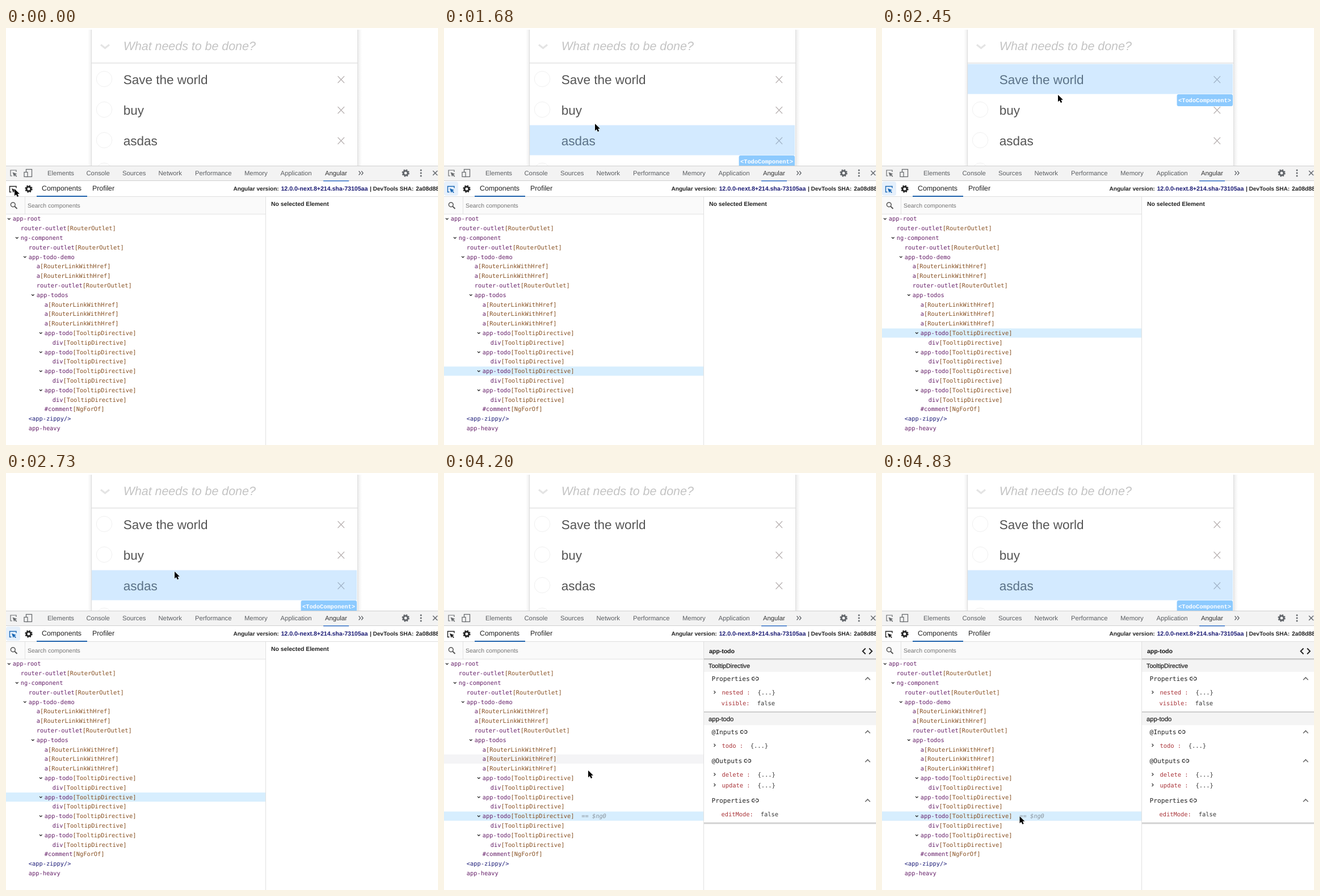
Write an HTML page that moves like this. It is 761 by 736 pixels and loops after 4.9 s.

```html
<!DOCTYPE html>
<html lang="en">
<head>
<meta charset="utf-8">
<title>Component inspector</title>
<style>
  html, body { margin: 0; width: 100%; height: 100%; overflow: hidden; background: #fff; }
  svg { display: block; width: 761px; height: 736px; }
  text { font-family: "Liberation Sans", Arial, sans-serif; white-space: pre; text-rendering: geometricPrecision; }
  text.mono { font-family: "DejaVu Sans Mono", Menlo, monospace; }
  text.code { font-family: "Liberation Mono", "Courier New", monospace; }
</style>
</head>
<body>
<script>
const NS = 'http://www.w3.org/2000/svg';
const LOOP = 4900, STEP = 70;
const ROW_H = 54, LIST_TOP = 63, TREE_TOP = 328.4, TREE_H = 16.8;

function add(parent, tag, attrs, content) {
  const el = document.createElementNS(NS, tag);
  for (const k in attrs) el.setAttribute(k, attrs[k]);
  if (content) el.textContent = content;
  return parent.appendChild(el);
}
const group = (parent, attrs) => add(parent, 'g', attrs);
const rect = (p, x, y, width, height, fill, more) => add(p, 'rect', { x, y, width, height, fill, ...more });
const line = (p, d, stroke, width = 1, more) =>
  add(p, 'path', { d, stroke, 'stroke-width': width, fill: 'none', ...more });
const text = (p, x, y, s, size, fill, more) => add(p, 'text', { x, y, 'font-size': size, fill, ...more }, s);
const mono = (p, x, y, s, fill, size = 10.33, more) => text(p, x, y, s, size, fill, { class: 'mono', ...more });
const show = (el, on) => el.setAttribute('visibility', on ? 'visible' : 'hidden');

const svg = add(document.body, 'svg', { viewBox: '0 0 761 736', width: 761, height: 736 });
rect(svg, 0, 0, 761, 736, '#fff');

// Todo page
const page = group(svg);
const defs = add(svg, 'defs');
function fade(id, from, to) {
  const g = add(defs, 'linearGradient', { id });
  add(g, 'stop', { offset: 0, 'stop-opacity': from });
  add(g, 'stop', { offset: 1, 'stop-opacity': to });
}
fade('left', 0, 0.07);
fade('right', 0.07, 0);
rect(page, 144, 3, 7, 240, 'url(#left)');
rect(page, 620, 3, 7, 240, 'url(#right)');
line(page, 'M150.5 3V243M619.5 3V243', '#dcdcdc');
rect(page, 151, 61, 468, 1.6, '#e4e4e4');
line(page, 'M167 29.5L174.5 35.5L182 29.5', '#e4e4e4', 3.2);
text(page, 206.7, 39, 'What needs to be done?', 21.4, '#c4c4c4', { 'font-style': 'italic' });

const circles = ['Save the world', 'buy', 'asdas', ''].map((label, i) => {
  const y = 90 + i * ROW_H;
  text(page, 206.7, y + 8.5, label, 22.5, '#555');
  line(page, `M584.5 ${y - 5}l11.5 12m0 -12l-11.5 12`, '#b5aeae', 1.1);
  return add(page, 'circle', { cx: 173, cy: y, r: 13.7, fill: 'none', stroke: '#f0f0f0' });
});

const overlay = group(page);
rect(overlay, 151, 0.5, 467, ROW_H - 1, 'rgb(104,182,255)', { opacity: 0.29 });
rect(overlay, 519.5, ROW_H, 98.5, 21, '#8dcafe', { rx: 3 });
text(overlay, 522, ROW_H + 14, '<TodoComponent>', 10.33, '#fff', { class: 'code', 'font-weight': 'bold' });

// Browser tools bar
const tools = group(svg);
rect(tools, 0, 243, 761, 493, '#fff');
rect(tools, 0, 243, 761, 27, '#f3f3f3');
line(tools, 'M0 243.5H761M0 269.5H761', '#d0d0d0');
const tabs = [['Elements', 73], ['Console', 141.5], ['Sources', 205], ['Network', 268.5],
  ['Performance', 333], ['Memory', 420], ['Application', 483.5], ['Angular', 562]];
for (const [name, x] of tabs) text(tools, x, 260, name, 11.25, name === 'Angular' ? '#333' : '#5a5d61');
rect(tools, 559, 269, 45, 1.6, '#3f78c8');
line(tools, 'M621.5 252.5l3 3.5l-3 3.5m4.5 -7l3 3.5l-3 3.5', '#5f6368', 1.3);

function gear(p, x, y, color) {
  const base = { cx: x, cy: y, fill: 'none', stroke: color };
  add(p, 'circle', { ...base, r: 3.9, 'stroke-width': 2.8 });
  add(p, 'circle', { ...base, r: 5.8, 'stroke-width': 1.7, 'stroke-dasharray': '2.5 2.055' });
}
function picker(p, x, y, color, width, right = 11) {
  const g = group(p, { transform: `translate(${x} ${y})` });
  line(g, `M4 11H1V1H${right}V4`, color, width);
  add(g, 'path', { d: 'M4.5 4.5L12.5 7.4L9.6 8.7L12.4 11.5L11.2 12.7L8.4 9.9L7.2 12.6Z', fill: color });
  return g;
}
picker(tools, 7, 250, '#6a6d70', 1.2);
rect(tools, 35.5, 249.5, 10, 13, 'none', { stroke: '#6a6d70', 'stroke-width': 1.3 });
rect(tools, 32, 254.5, 6, 8, '#f3f3f3', { stroke: '#6a6d70', 'stroke-width': 1.3 });
gear(tools, 704, 256, '#5f6368');
for (const dy of [-5, 0, 5]) add(tools, 'circle', { cx: 731, cy: 256 + dy, r: 1.5, fill: '#5f6368' });
line(tools, 'M752 252l8 8m0 -8l-8 8', '#5f6368', 1.4);

// Extension bar
const pickOff = picker(tools, 5.5, 278.5, '#222', 1.4, 12.5);
const pickOn = group(tools);
rect(pickOn, 0, 271, 25, 25, '#e6f0fb', { rx: 4 });
picker(pickOn, 5.5, 278.5, '#1967b5', 1.4, 12.5);
gear(tools, 40, 284, '#222');
text(tools, 63, 287, 'Components', 12.35, '#222');
text(tools, 152, 287, 'Profiler', 12.35, '#222');
line(tools, 'M0 297.5H761', '#dedede');
rect(tools, 54, 296, 89, 2, '#1f62ac');
const bold = { 'font-weight': 'bold' };
text(tools, 400.5, 287, 'Angular version:', 10.1, '#222', bold);
text(tools, 484.5, 287, '12.0.0-next.8+214.sha-73105aa', 10.55, '#1b1b74', bold);
text(tools, 641, 287, '| DevTools SHA:', 10, '#222', bold);
text(tools, 722, 287, '2a08d88', 10.3, '#222', bold);

// Search and tree
rect(tools, 0, 298, 458, 30, '#fafafa');
line(tools, 'M0 328.5H458M33.5 298V328', '#e3e3e3');
line(tools, 'M457.5 298V736', '#e0e0e0');
add(tools, 'circle', { cx: 12.3, cy: 311.8, r: 3.9, fill: 'none', stroke: '#555', 'stroke-width': 1.5 });
line(tools, 'M15.2 314.8L19.5 319', '#555', 1.9);
text(tools, 38, 317, 'Search components', 10.45, '#757575');

const bar = color => rect(tools, 0, 0.3, 457, TREE_H - 0.6, color);
const hoverBar = bar('#f4f4f6'), pickBar = bar('#d7eefe');
const todo = ['4v app-todo[TooltipDirective]', '5 div[TooltipDirective]'];
const link = 'a[RouterLinkWithHref]', outlet = 'router-outlet[RouterOutlet]';
const tree = ['0v app-root', `1 ${outlet}`, '1v ng-component', `2 ${outlet}`, '2v app-todo-demo',
  `3 ${link}`, `3 ${link}`, `3 ${outlet}`, '3v app-todos', `4 ${link}`, `4 ${link}`, `4 ${link}`,
  ...todo, ...todo, ...todo, ...todo, '4 #comment[NgForOf]', '2 <app-zippy/>', '2 app-heavy'];
const FIRST_TODO = tree.indexOf(todo[0]);
tree.forEach((row, i) => {
  const [, depth, open, name, dir] = row.match(/^(\d)(v?) ([^[]+)(.*)$/);
  const x = 12 + 14 * depth, y = TREE_TOP + TREE_H * (i + 0.5);
  if (open) line(tools, `M${x - 9} ${y - 1.1}l2.3 2.2l2.3 -2.2`, '#222', 1.2);
  const label = mono(tools, x - 0.2, y + 3.5, '', name[0] === '<' ? '#1c1c78' : '#662069');
  add(label, 'tspan', {}, name);
  if (dir) add(label, 'tspan', { fill: '#875022' }, dir);
});
const treeY = i => TREE_TOP + TREE_H * i;
const ref = mono(tools, 242.3, treeY(16.5) + 3.5, '== $ng0', '#8b949c', 10.33, { 'font-style': 'italic' });

// Property panel
const empty = text(tools, 467, 314, 'No selected Element', 10.4, '#222', bold);
const panel = group(tools);

function shadow(y) {
  rect(panel, 458, y - 1, 303, 1.6, '#bdbdbd');
  rect(panel, 458, y + 0.6, 303, 1.4, '#e6e6e6');
}
function card(y, h, title, size) {
  rect(panel, 458, y, 303, 22, '#f4f4f4');
  text(panel, 466, y + 14.5, title, size, '#222', { stroke: '#222', 'stroke-width': 0.25 });
  shadow(y + h);
}
function section(y, name) {
  mono(panel, 471.6, y + 4, name, '#222', 11.15);
  const x = 472 + name.length * 6.7 + 3;
  line(panel, `M${x + 5} ${y - 2.6}h-1.9a2.6 2.6 0 0 0 0 5.2h1.9m2.4 -5.2h1.9a2.6 2.6 0 0 1 0 5.2h-1.9M${x + 4} ${y}h4.4`, '#333', 1.2);
  line(panel, `M742 ${y + 2.2}l4.3 -4.3l4.3 4.3`, '#666', 1.5);
}
function prop(y, name, x, value) {
  const nested = value[0] === '{';
  if (nested) line(panel, `M475.5 ${y - 3}l2.5 2.5l-2.5 2.5`, '#333', 1.1);
  mono(panel, nested ? 489.5 : 488.5, y + 3.8, name, '#a83237', 10.4);
  mono(panel, x, y + 3.8, value, '#333', 10.4);
}
card(329, 93, 'TooltipDirective', 10.75);
section(363, 'Properties');
prop(387.5, 'nested :', 552.5, '{...}');
prop(406.5, 'visible:', 551.7, 'false');
card(423, 195, 'app-todo', 11.2);
section(457, '@Inputs');
prop(481, 'todo :', 539.7, '{...}');
section(508, '@Outputs');
prop(532.5, 'delete :', 552.5, '{...}');
prop(551, 'update :', 552.5, '{...}');
section(578, 'Properties');
prop(602.5, 'editMode:', 557.7, 'false');
rect(panel, 458, 298, 303, 30, '#f4f4f4');
shadow(328.4);
text(panel, 467, 318, 'app-todo', 10.5, '#111', bold);
line(panel, 'M742.5 309.5l-5 5l5 5m6.5 -10l5 5l-5 5', '#222', 1.9);

const cursor = add(svg, 'path', {
  d: 'M0 0V12.2L2.8 9.7L4.9 14L7.2 13L5.2 8.7H8.9Z',
  fill: '#000', stroke: '#fff', 'stroke-width': 0.9, 'paint-order': 'stroke'
});

// Pointer path: time, x, y
const path = [
  [0, 15, 284], [840, 15, 284], [1050, 90, 262], [1260, 200, 222], [1400, 240, 200],
  [1610, 262, 177], [1680, 266, 169], [1820, 280, 127], [1890, 285, 112], [2100, 302, 95],
  [2240, 306, 92], [2380, 309, 105], [2450, 310, 118], [2590, 304, 159], [2660, 300, 172],
  [2730, 297, 174], [3010, 290, 189], [3150, 288, 190], [3780, 288, 190], [3920, 280, 290],
  [4060, 264, 455], [4130, 257, 510], [4200, 254, 525], [4340, 251, 541], [4550, 246, 572],
  [4690, 243, 596], [4760, 242.5, 604], [4830, 242.5, 606]
];
const PICK_ON = 560, PICK_OFF = 3290, SELECT = 3360, PANEL = 3500;

function pointer(t) {
  const i = Math.max(1, path.findIndex(p => p[0] >= t));
  const [t0, x0, y0] = path[i - 1], [t1, x1, y1] = path[i];
  const k = Math.max(0, (t - t0) / (t1 - t0));
  return [x0 + (x1 - x0) * k, y0 + (y1 - y0) * k];
}
// Todo under the pointer while picking, or -1
function todoAt(t) {
  const [x, y] = pointer(t);
  return t > PICK_ON && x > 151 && y < 243 ? Math.floor((y - LIST_TOP) / ROW_H) : -1;
}
function place(el, y, on) {
  show(el, on);
  el.setAttribute('transform', `translate(0 ${y})`);
}

function draw(t) {
  const [x, y] = pointer(t);
  cursor.setAttribute('transform', `translate(${x} ${y})`);

  const picking = t >= PICK_ON && t < PICK_OFF;
  show(pickOn, picking);
  show(pickOff, !picking);

  const selected = t >= SELECT;
  const hover = selected ? Math.floor((pointer(t - STEP)[1] - TREE_TOP) / TREE_H) : -1;
  let active = -1;
  if (picking) active = todoAt(t - STEP);
  else if (hover >= FIRST_TODO) active = (hover - FIRST_TODO) >> 1;
  place(overlay, LIST_TOP + ROW_H * active, active >= 0);
  circles.forEach((c, i) => show(c, i !== active));

  const marked = t >= PICK_OFF ? 2 : todoAt(t - 2 * STEP);
  place(pickBar, treeY(FIRST_TODO + 2 * marked), marked >= 0);
  place(hoverBar, treeY(hover), hover >= 0);
  show(ref, selected);
  show(panel, t >= PANEL);
  show(empty, t < PANEL);
}

const start = performance.now();
function tick() {
  const t = (performance.now() - start) % LOOP;
  draw(Math.floor(t / STEP) * STEP);
  requestAnimationFrame(tick);
}
tick();
</script>
</body>
</html>
```
